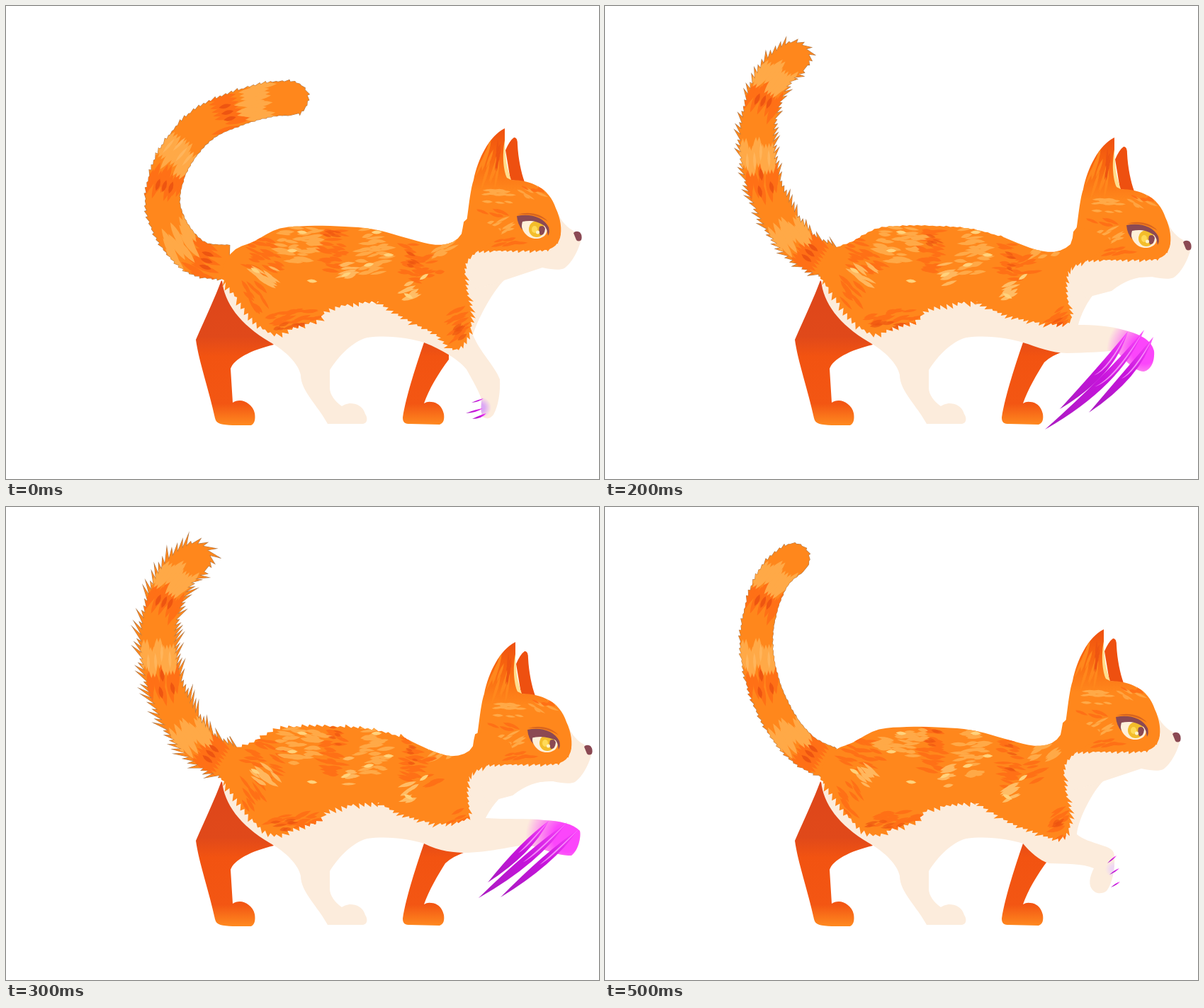
Animation, 837 px wide and 669 px high, one loop 0.6 s. Source, as an HTML page with a canvas:

```html
<!DOCTYPE html>
<html lang="en">
<head>
<meta charset="utf-8">
<title>Ginger cat swipe</title>
<style>
html, body { margin: 0; width: 100%; height: 100%; overflow: hidden; background: #fff; }
canvas { display: block; }
</style>
</head>
<body>
<canvas id="stage" width="837" height="669"></canvas>
<script>
const ctx = document.getElementById('stage').getContext('2d');
const ORANGE = '#ff871c', CREAM = '#fcecdc', LIGHT = '#ffa947', DARK = '#ff7016',
      DEEP = '#ee5511', PALE = '#ffd27c', MAROON = '#8b4953';

let seed = 1;
function rnd() {
  seed = (seed * 16807) % 2147483647;
  return seed / 2147483647;
}

// Smooth curve through the points, sampled at an even spacing
function spline(pts, step) {
  const out = [pts[0]];
  let last = pts[0], run = 0;
  for (let i = 0; i < pts.length - 1; i++) {
    const a = pts[i - 1] || pts[i], b = pts[i], c = pts[i + 1], d = pts[i + 2] || c;
    for (let k = 1; k <= 24; k++) {
      const t = k / 24;
      const p = [0, 1].map(j => b[j] + t * ((c[j] - a[j]) / 2 +
        t * (a[j] - 2.5 * b[j] + 2 * c[j] - d[j] / 2 + t * (1.5 * (b[j] - c[j]) + (d[j] - a[j]) / 2))));
      run += Math.hypot(p[0] - last[0], p[1] - last[1]);
      last = p;
      if (run >= step) { out.push(p); run = 0; }
    }
  }
  out.push(last);
  return out;
}

// Unit direction from p to q
function dir(p, q) {
  const d = Math.hypot(q[0] - p[0], q[1] - p[1]) || 1;
  return [(q[0] - p[0]) / d, (q[1] - p[1]) / d];
}

// Edge with hair tips on its left side; lean tilts them along the edge
function fur(pts, amp, lean = 0.8, step = 7) {
  const s = spline(pts, step), out = [];
  s.forEach((p, i) => {
    out.push(p);
    const q = s[i + 1];
    if (!q || amp < 0.3) return;
    const [ux, uy] = dir(p, q), a = amp * (0.3 + rnd() * 0.9);
    out.push([(p[0] + q[0]) / 2 + (uy + ux * lean) * a, (p[1] + q[1]) / 2 + (uy * lean - ux) * a]);
  });
  return out;
}

function polygon(pts) {
  const path = new Path2D();
  pts.forEach(p => path.lineTo(p[0], p[1]));
  path.closePath();
  return path;
}

function fill(shape, color) {
  ctx.fillStyle = color;
  ctx.fill(typeof shape === 'string' ? new Path2D(shape) : shape);
}

function clipped(path, draw) {
  ctx.save();
  ctx.clip(path);
  draw();
  ctx.restore();
}

function leaf(x, y, len, w, angle, color) {
  ctx.save();
  ctx.translate(x, y);
  ctx.rotate(angle);
  fill(`M${-len / 2},0 Q0,${-w} ${len / 2},0 Q0,${w} ${-len / 2},0Z`, color);
  ctx.restore();
}

// Scatter strands in an ellipse
function patch(x, y, rx, ry, n, angle, color, len = 24, w = 5) {
  for (let i = 0; i < n; i++) {
    const a = rnd() * 6.283, r = Math.sqrt(rnd());
    leaf(x + Math.cos(a) * r * rx, y + Math.sin(a) * r * ry,
      len * (0.6 + rnd() * 0.6), w * (0.7 + rnd() * 0.5), angle + rnd() * 0.4 - 0.2, color);
  }
}

function vertical(y0, y1, ...stops) {
  const g = ctx.createLinearGradient(0, y0, 0, y1);
  stops.forEach(([at, color]) => g.addColorStop(at, color));
  return g;
}

const tails = {
  curled: [[315, 362], [272, 357], [240, 327], [222, 285], [226, 245], [243, 207],
           [278, 168], [330, 144], [375, 132], [402, 131]],
  raised: [[318, 362], [283, 345], [253, 312], [231, 270], [218, 228], [214, 190],
           [218, 155], [229, 118], [245, 91], [266, 74]]
};

function drawTail(name, puff) {
  const mid = spline(tails[name], 10), half = name === 'curled' ? 23.5 : 22;
  const left = [], right = [];
  mid.forEach((p, i) => {
    const [ux, uy] = dir(mid[Math.max(0, i - 1)], mid[Math.min(mid.length - 1, i + 1)]);
    left.push([p[0] + uy * half, p[1] - ux * half]);
    right.unshift([p[0] - uy * half, p[1] + ux * half]);
  });
  const end = mid.at(-1), [ux, uy] = dir(mid.at(-3), end), a0 = Math.atan2(-ux, uy);
  for (let k = 1; k < 6; k++) {
    const a = a0 + k * Math.PI / 6;
    left.push([end[0] + Math.cos(a) * half, end[1] + Math.sin(a) * half]);
  }
  const tail = polygon([...fur(left, puff, 1.2, 8), ...fur(right, puff > 4 ? puff : puff / 3, -1.2, 8)]);
  ctx.strokeStyle = 'rgba(150,75,10,.75)';
  ctx.lineWidth = 1.2;
  ctx.stroke(tail);
  fill(tail, ORANGE);

  const band = (at, n, len, w, color, spread = 0.95) => {
    for (let k = 0; k < n; k++) {
      const i = Math.round((at + (rnd() - 0.5) * 0.05) * (mid.length - 1));
      const [vx, vy] = dir(mid[Math.max(0, i - 1)], mid[i + 1]);
      const off = half * spread * (n > 1 ? 2 * k / (n - 1) - 1 : 0);
      leaf(mid[i][0] + vy * off, mid[i][1] - vx * off, len, w, Math.atan2(vy, vx) + 0.12, color);
    }
  };
  clipped(tail, () => {
    for (const [light, dark] of [[0.19, 0.09], [0.53, 0.42], [0.86, 0.76]]) {
      band(dark, 9, 42, 8, DARK);
      band(light, 10, 44, 9, LIGHT);
      band(dark, 3, 18, 6, DEEP, 0.4);
    }
    band(0.53, 4, 26, 4, '#ffb55c', 0.7);
  });
}

function drawFarLegs(reach) {
  const shade = vertical(390, 593, [0, '#de461a'], [0.38, '#e0491a'], [0.52, '#f25311'],
    [0.85, '#f35613'], [1, '#ff8a20']);
  fill(`M304,388 C296,410 282,440 268,472 C272,502 287,545 295,583 C297,592 305,592 320,593
    L346,593 C352,590 352,582 351,576 C349,565 338,558 330,558 Q324,558 320,561 L317,513
    C322,499 345,487 378,479 L340,440Z`, shade);
  fill(`M592,470 C580,505 565,550 560,582 C560,590 564,591 570,591 L612,592
    C618,590 619,584 618,577 C615,563 605,560 600,560 Q595,559 590,562
    C597,542 610,520 ${reach ? '620,504 Q630,494 654,486' : '625,500'} L625,470Z`, shade);
}

function drawBody(pose) {
  const [dx, dy] = pose.head;
  const back = [[304, 386], [308, 364], [324, 344], [350, 333], [385, 315], [430, 311], [480, 312], [520, 316], [565, 328]];
  const neck = [[565, 328], [600 + dx * 0.3, 337 + dy * 0.5], [625 + dx * 0.6, 336 + dy * 0.9],
    [642 + dx, 324 + dy], [652 + dx, 300 + dy], [700 + dx, 320 + dy], [664 + dx, 347 + dy]];
  const belly = [[525, 417], [490, 420], [452, 429], [440, 443], [405, 454], [385, 463],
    [365, 457], [345, 438], [327, 413], [308, 388]];
  const coat = polygon([...fur(back, pose.ruffle, -0.8, 9), ...spline(neck, 8),
    ...fur([[664 + dx, 347 + dy], ...pose.bib, [525, 417]], 6, 1), ...fur(belly, 7, -0.5, 8)]);
  fill(coat, ORANGE);

  const marks = [
    [365, 355, 28, 28, 22, 0.3, DARK], [350, 408, 16, 28, 12, 0.9, DARK],
    [412, 338, 28, 26, 30, 0.05, LIGHT], [461, 343, 16, 36, 28, 0.15, DARK],
    [440, 322, 12, 10, 6, 0, LIGHT], [519, 346, 20, 38, 32, -0.1, LIGHT],
    [572, 360, 14, 38, 22, 0.2, DARK], [484, 375, 7, 20, 9, -0.15, '#ffb75e'],
    [368, 380, 18, 13, 12, 0.6, '#ffb75e'], [410, 442, 38, 13, 24, -0.2, DARK],
    [570, 403, 8, 15, 9, -0.4, '#ffbd66'], [620, 348, 18, 14, 10, -0.5, LIGHT],
    [600, 372, 14, 22, 8, -0.3, DARK], [640, 452, 12, 28, 16, -0.5, DARK]
  ];
  const dots = [[352, 374, 0.5], [404, 346, 0], [418, 320, 0.1], [480, 380, -0.4], [523, 320, 0],
    [512, 366, -0.2], [568, 410, 0.5], [590, 383, -0.6], [432, 389, 0.1], [540, 352, 0]];
  clipped(coat, () => {
    marks.forEach(m => patch(...m));
    dots.forEach(([x, y, a]) => leaf(x, y, 15, 5, a, PALE));
    patch(462, 326, 9, 16, 5, 0.2, DEEP + 'aa', 15, 4);
    patch(573, 352, 5, 22, 6, 0.3, DEEP + 'aa', 14, 4);
    patch(395, 449, 26, 8, 7, -0.2, DEEP + 'aa', 18, 5);
    patch(640, 457, 7, 14, 5, -0.5, DEEP + 'aa', 16, 5);
  });
}

function drawHead([dx, dy], squint) {
  ctx.save();
  ctx.translate(dx, dy);
  fill('M705,204 Q711,190 717,186 Q722,185 722,196 C723,216 727,235 732,249 L712,246Z', '#ee5010');
  fill(`M774,282 C781,300 788,311 801,318 L812,330 C808,345 800,362 788,371 Q780,375 757,370
    C738,369 720,374 700,390 L662,400 L650,350 L740,300Z`, CREAM);
  const face = new Path2D(`M640,346 C652,320 652,270 660,246 C666,216 682,184 704,173 L704,205
    C705,225 709,238 713,246 C740,246 767,257 776,286 C783,301 785,316 782,328
    Q778,341 764,345 L665,346Z`);
  fill(face, vertical(173, 262, [0, '#ee5010'], [0.4, '#f8650f'], [1, ORANGE]));
  fill(polygon([...fur([[783, 322], [765, 343], [720, 345], [664, 346]], 4), [690, 300], [760, 300]]), ORANGE);
  clipped(face, () => {
    patch(682, 228, 14, 22, 10, -1.25, ORANGE, 40, 5);
    patch(696, 214, 4, 18, 4, -1.4, DEEP, 30, 4);
    patch(695, 270, 20, 12, 12, 0.1, LIGHT, 20, 4);
    patch(694, 314, 18, 13, 12, -0.4, LIGHT, 20, 4);
    patch(745, 264, 20, 7, 8, 0.5, '#ffa340', 18, 4);
    patch(685, 292, 16, 8, 7, 0.3, DARK, 18, 4);
    patch(712, 335, 26, 6, 8, -0.2, DARK, 20, 4);
    patch(750, 257, 18, 4, 6, 0.5, DARK, 14, 4);
  });
  fill('M704,190 C700,210 702,232 707,243 L713,246 C708,232 704,215 704,190Z', '#ffdc8c');

  const eye = new Path2D('M726,303 C727,319 736,329 748,329 C760,329 766,321 763,311 C753,302 740,300 726,303Z');
  fill(eye, '#fff0d9');
  clipped(eye, () => {
    fill('M738,316 a11,11 0 1,0 22,0 a11,12 0 1,0 -22,0', '#f3bd2b');
    fill('M753,312 q6,-3 8,3 q-1,10 -7,9 q-3,-6 -1,-12', MAROON);
    fill('M742,316 a4,5 0 1,0 8,0 a4,5 0 1,0 -8,0', '#ffda58');
    fill('M748,320 a2.5,2.5 0 1,0 5,0 a2.5,2.5 0 1,0 -5,0', '#fff3c8');
    if (squint) fill('M720,295 H768 V316 Q748,303 725,309Z', MAROON);
  });
  fill('M721,297 C739,293 759,298 766,313 Q768,320 765,325 Q764,315 760,311 C749,303 738,303 729,305 Q727,311 729,317 Q722,309 721,297Z', MAROON);
  fill('M722,295 C738,290 756,294 765,305 C754,297 740,294 722,295Z', '#d9651f');
  fill('M801,321 Q804,317 810,320 Q814,325 812,331 Q808,334 805,331Z', MAROON);
  ctx.restore();
}

// Curved blade from root to tip
function claw(x0, y0, x1, y1, w, bend, color) {
  const [ux, uy] = dir([x0, y0], [x1, y1]);
  const side = k => `${x0 + (x1 - x0) * 0.4 + uy * k},${y0 + (y1 - y0) * 0.4 - ux * k}`;
  const g = ctx.createLinearGradient(x0, y0, x1, y1);
  g.addColorStop(0, color);
  g.addColorStop(0.45, '#c714dc');
  g.addColorStop(1, '#a91cc0');
  fill(`M${x0},${y0} Q${side(bend + w)} ${x1},${y1} Q${side(bend - w)} ${x0},${y0}Z`, g);
  if (w < 6) return;
  fill(`M${x0},${y0} Q${side(bend + 2)} ${(x0 + x1) / 2},${(y0 + y1) / 2 + bend / 2}
    Q${side(bend - 2)} ${x0},${y0}Z`, 'rgba(255,175,255,.75)');
}

const legs = {
  down: `C606,482 638,498 650,514 C660,532 668,546 671,556 C671,566 669,574 673,581
    Q681,587 688,578 C695,566 698,545 697,528 C690,509 669,490 659,465 C668,437 690,400 703,388`,
  lifted: `C600,488 613,500 627,504 C650,505 674,504 690,511 C686,519 683,528 685,536
    C689,547 700,549 708,543 C716,533 720,512 719,495 C719,484 712,482 700,478
    C688,474 674,470 666,463 C668,440 690,400 703,388`,
  forward: `C610,482 630,491 652,491 C680,490 702,490 719,487 C733,496 742,515 760,517
    C772,515 776,500 775,488 C771,471 753,464 735,459 C712,452 690,451 668,451
    C674,428 690,402 705,394 Q725,384 775,383`,
  strike: `C612,487 632,489 652,489 C690,487 712,480 735,478 C758,482 774,493 798,493
    C808,486 812,466 810,458 C800,448 782,444 760,443 C735,440 708,442 677,440
    C685,424 700,405 715,398 Q738,387 775,388`
};

function legPath(name, [dx, dy]) {
  return new Path2D(`M305,388 C308,420 330,450 372,475 C395,488 413,506 416,522 C416,544 440,565 454,591
    L504,591 C510,590 511,583 507,577 C504,566 495,562 485,562 Q478,563 474,566
    C465,560 457,550 457,540 L457,515 C470,494 490,474 510,469 C540,465 570,470 590,476
    ${legs[name]} L${757 + dx},${370 + dy} L${720 + dx},${335 + dy} L640,360 L600,420 L450,420Z`);
}

const pink = '#fb46fb', lilac = '#dca8f5';
const flank = [[655, 372], [650, 400], [655, 430], [655, 447], [620, 448], [580, 440], [550, 430]];
const chest = [[648, 365], [649, 400], [655, 430]];
const lifted = {
  head: [0, 0], leg: 'lifted', tail: 'raised', puff: 3, ruffle: 0,
  bib: [...chest, [654, 455], [643, 468], [625, 466], [608, 459], [580, 449], [555, 436]],
  glow: [702, 540, 22, '#d94df0'],
  claws: [[692, 531, 650, 567, 6, 7], [702, 531, 667, 571, 6, 7], [711, 533, 690, 566, 5, 5], [718, 534, 705, 563, 5, 5]]
};
const forward = {
  head: [15, 13], leg: 'forward', tail: 'raised', puff: 8, ruffle: 1.3, bib: flank,
  glow: [762, 487, 54, pink],
  claws: [[738, 460, 642, 570, 13, 15], [761, 458, 621, 599, 13, 20], [774, 468, 683, 575, 12, 12]]
};
const poses = [
  { ...lifted, leg: 'down', tail: 'curled',
    bib: [...chest, [654, 460], [639, 484], [625, 481], [608, 464], [580, 450], [555, 436]],
    glow: [670, 568, 15, lilac],
    claws: [[674, 555, 657, 561, 2, 1], [673, 569, 649, 576, 2.5, 1], [678, 576, 658, 584, 3, 2]] },
  lifted,
  forward,
  { ...forward, head: [15, 18], leg: 'strike', puff: 12, ruffle: 4, squint: true,
    bib: [[655, 378], [650, 405], [653, 430], [647, 442], [610, 447], [575, 439], [550, 430]],
    glow: [793, 467, 60, pink],
    claws: [[766, 444, 680, 531, 12, 4], [792, 446, 667, 553, 13, 6], [808, 456, 698, 552, 11, 4]] },
  { ...forward, glow: [752, 490, 23, lilac],
    claws: [[749, 465, 717, 498, 3, 1], [767, 474, 712, 522, 4, 3], [780, 485, 727, 530, 4, 4]] },
  { ...lifted, glow: [718, 512, 12, '#eed6f3'],
    claws: [[722, 493, 709, 504, 1.8, 0], [726, 511, 712, 520, 1.8, 0], [727, 530, 714, 538, 1.8, 0]] }
];

function draw(pose) {
  seed = 4217;
  ctx.fillStyle = '#fff';
  ctx.fillRect(0, 0, 837, 669);
  drawFarLegs(pose.head[0] > 0);
  const leg = legPath(pose.leg, pose.head);
  fill(leg, CREAM);
  clipped(leg, () => {
    const [x, y, r, color] = pose.glow;
    const g = ctx.createRadialGradient(x, y, r * 0.35, x, y, r);
    g.addColorStop(0, color);
    g.addColorStop(1, color + '00');
    ctx.fillStyle = g;
    ctx.fillRect(x - r, y - r, 2 * r, 2 * r);
  });
  drawTail(pose.tail, pose.puff);
  seed = 911;
  drawHead(pose.head, pose.squint);
  seed = 77;
  drawBody(pose);
  pose.claws.forEach(c => claw(...c, pink));
}

let shown = -1;
function tick() {
  const i = Math.floor(performance.now() / 100) % poses.length;
  if (i !== shown) draw(poses[shown = i]);
  requestAnimationFrame(tick);
}
tick();
</script>
</body>
</html>
```
